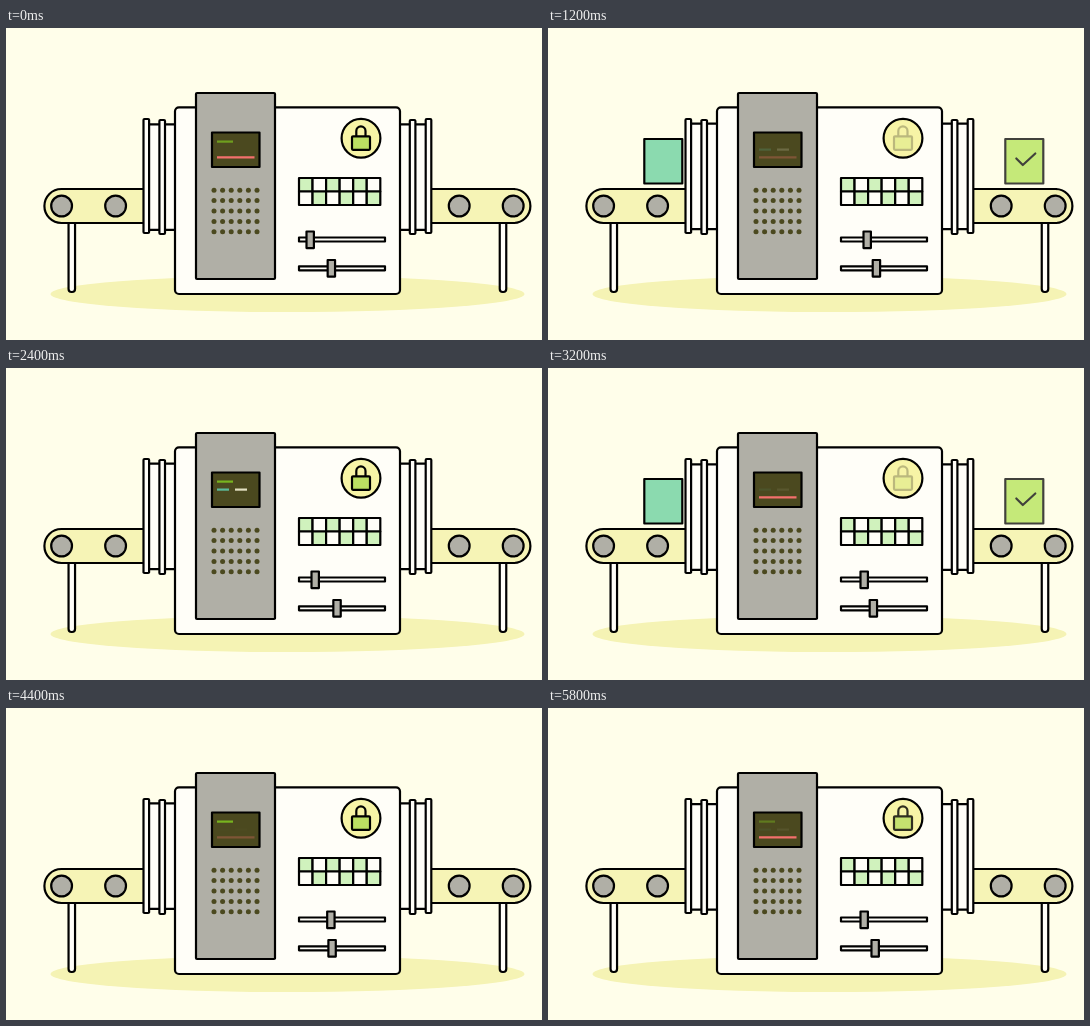
An HTML page for the animation above (6000 ms loop, 536x312 px).

```html
<!DOCTYPE html>
<html lang="en">
<head>
<meta charset="utf-8">
<title>Box machine</title>
<style>
  html, body { margin: 0; width: 100%; height: 100%; overflow: hidden; background: #fffeea; }
  svg { display: block; width: 536px; height: 312px; }
  .line { stroke: #000; stroke-width: 2.2; stroke-linejoin: round; stroke-linecap: round; }
  .paper { fill: #fffef8; }
  .belt { fill: #f6f4b6; }
  .metal { fill: #b0afa6; }
</style>
</head>
<body>
<svg viewBox="0 0 536 312">
  <ellipse cx="281.5" cy="266" rx="237" ry="18" fill="#f5f3b4"/>
  <g class="line">
    <g id="conveyors"></g>
    <g id="boxIn">
      <rect y="111" width="38" height="44.5" fill="#8bdaaf"/>
    </g>
    <g id="boxOut">
      <rect y="111" width="38" height="44.5" fill="#b2e352"/>
      <path d="M11 130.5L17.5 137L30 125.5" fill="none"/>
    </g>
    <g class="paper">
      <g id="pipes"></g>
      <g id="flanges"></g>
      <rect x="169" y="79.3" width="225" height="186.7" rx="4"/>
    </g>
    <rect class="metal" x="190" y="65" width="79" height="186" rx="1"/>
    <rect x="206" y="104.5" width="47.5" height="34.5" fill="#4b491f"/>
    <circle cx="355" cy="110.3" r="19.4" fill="#f7f4a6"/>
    <g id="lock">
      <path d="M350.3 108V103a4.6 4.6 0 0 1 9.2 0V108" fill="none"/>
      <rect x="346" y="108.3" width="18" height="13.5" rx="1" fill="#bade62"/>
    </g>
    <g id="cells"></g>
    <g class="paper">
      <rect x="293" y="209.5" width="86" height="4"/>
      <rect x="293" y="238.3" width="86" height="4"/>
    </g>
    <g class="metal">
      <rect id="knobA" y="203.5" width="7.4" height="16.6"/>
      <rect id="knobB" y="232" width="7.4" height="16.6"/>
    </g>
  </g>
  <g id="dots" fill="#4b491f"></g>
  <g fill="none" stroke-width="2.2">
    <path id="green" d="M211 113.6H227" stroke="#7fc41f"/>
    <g id="pair">
      <path d="M211 121.6H223" stroke="#5fd0b0"/>
      <path d="M229 121.6H241" stroke="#fffde0"/>
    </g>
    <path id="red" d="M211 129.4H248.5" stroke="#f4706c"/>
  </g>
</svg>
<script>
const LOOP = 6, STEPS_PER_SECOND = 5, BOX_SPEED = 77.5;
const get = id => document.getElementById(id);

function add(parent, tag, attrs) {
  const node = document.createElementNS('http://www.w3.org/2000/svg', tag);
  for (const key in attrs) node.setAttribute(key, attrs[key]);
  get(parent).append(node);
}

// The two sides mirror each other around the middle of the machine.
for (const side of [-1, 1]) {
  const at = (offset, width = 0) => 281.4 + side * offset - width / 2;
  add('conveyors', 'rect', { class: 'paper', x: at(215.6, 6.5), y: 180, width: 6.5, height: 84, rx: 3 });
  add('conveyors', 'rect', { class: 'belt', x: at(175, 136), y: 161, width: 136, height: 34, rx: 17 });
  for (const offset of [171.8, 225.8])
    add('conveyors', 'circle', { class: 'metal', cx: at(offset), cy: 178, r: 10.4 });
  add('pipes', 'rect', { x: at(125, 31), y: 96, width: 31, height: 105.5 });
  add('flanges', 'rect', { x: at(141.1, 5.6), y: 91, width: 5.6, height: 114, rx: 1 });
  add('flanges', 'rect', { x: at(125.2, 5.6), y: 92, width: 5.6, height: 114, rx: 1 });
}

for (let row = 0; row < 2; row++)
  for (let col = 0; col < 6; col++)
    add('cells', 'rect', {
      x: 293 + col * 13.55, y: 150 + row * 13.5, width: 13.55, height: 13.5,
      fill: (row + col) % 2 ? '#fffef8' : '#d0f2bd'
    });

for (let row = 0; row < 5; row++)
  for (let col = 0; col < 6; col++)
    add('dots', 'circle', { cx: 208 + col * 8.6, cy: 162.2 + row * 10.4, r: 2.5 });

const ramp = (t, from, to) => Math.min(1, Math.max(0, (t - from) / (to - from)));
const ease = (t, from, to) => { const k = ramp(t, from, to); return k * k * (3 - 2 * k); };
const bump = (t, from, peak, to) => ease(t, from, peak) - ease(t, peak, to);
const wave = (t, period, peak) => 0.5 + 0.5 * Math.cos((t - peak) / period * 2 * Math.PI);

const fade = (id, opacity) => get(id).setAttribute('opacity', Math.max(0, opacity));
const shift = (id, x, y = 0) => get(id).setAttribute('transform', `translate(${x} ${y})`);

function draw(time) {
  const t2 = time % 2, t3 = time % 3;

  // Both boxes travel together during the middle of each cycle.
  const travel = (t2 - 0.8) * BOX_SPEED;
  const moving = t2 > 0.5 && t2 < 1.5;
  shift('boxIn', 65.3 + travel);
  shift('boxOut', 426.3 + travel);
  fade('boxIn', moving ? ease(t2, 0.55, 1.2) : 0);
  fade('boxOut', moving ? 1 - ease(t2, 1, 1.6) : 0);

  fade('lock', 1 - ramp(t2, 0.4, 0.8) + ramp(t2, 0.95, 2));
  fade('green', wave(time, 2, 0.3) - 0.1);
  fade('pair', wave(time, 1.5, 0.74) ** 1.5);
  fade('red', 1 - 0.7 * ramp(t3, 0.2, 0.8) - 0.3 * ramp(t3, 1.4, 1.6) + ramp(t3, 2.4, 2.8));

  // The upper knob makes one long sweep and a short nudge around each restart.
  const nearRestart = Math.min(t3, 3 - t3);
  const nudge = 5 * ease(nearRestart, 0, 0.2) + 7 * bump(nearRestart, 0, 0.2, 0.6);
  shift('knobA', 300.5 + nudge + 20 * bump(t3, 0.7, 1.7, 2.4));
  shift('knobB', 321.4 + 6 * wave(time, 1.5, 0.85));
  shift('pipes', 0, 1.2 * wave(time, 3, 0.3) - 0.8);
}

const start = performance.now();
function tick() {
  const elapsed = (performance.now() - start) / 1000 % LOOP;
  draw(Math.floor(elapsed * STEPS_PER_SECOND) / STEPS_PER_SECOND);
  requestAnimationFrame(tick);
}
tick();
</script>
</body>
</html>
```
